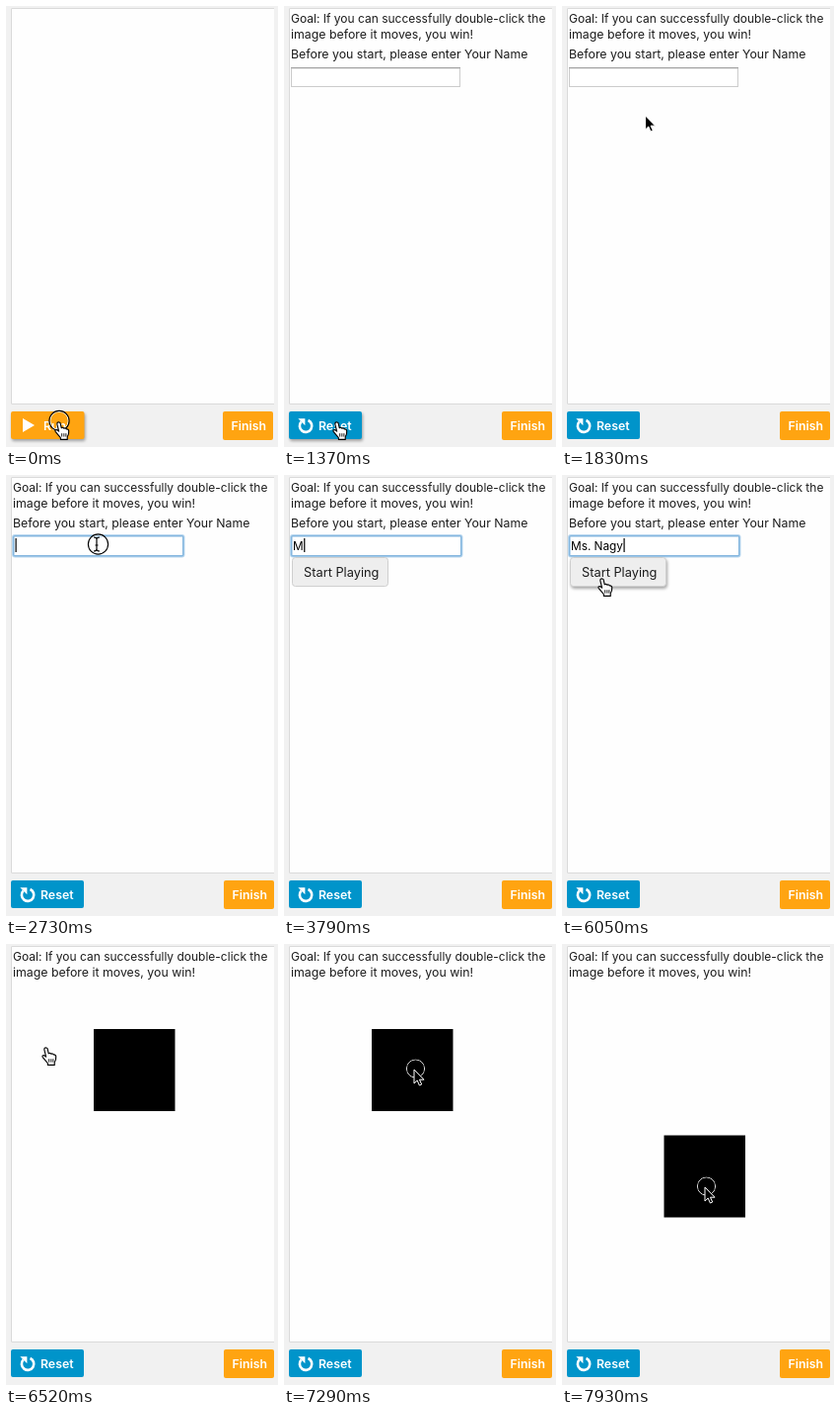
An HTML page that plays this animation: 276x446 px, repeating every 8000 ms.

```html
<!DOCTYPE html>
<html lang="en">
<head>
<meta charset="utf-8">
<title>Double-click game</title>
<style>
html, body { margin: 0; width: 100%; height: 100%; overflow: hidden; background: #f1f1f1; }
svg { display: block; width: 276px; height: 446px; }
text { font: 12px Inter, "Open Sans", sans-serif; fill: #1c1c1c; white-space: pre; }
.wide { font-size: 12.35px; }
.label { font-size: 12.3px; font-weight: 600; fill: #fff; }
.hover { filter: drop-shadow(1.5px 2px 1.5px rgba(0, 0, 0, .34)); }
</style>
</head>
<body>
<svg viewBox="0 0 276 446">
  <rect width="276" height="446" fill="#f1f1f1"/>
  <rect x="5" y="2" width="267" height="401" fill="#fefefe"/>
  <path d="M272 2.5H5.5V402.5H272" fill="none" stroke="#dadada"/>

  <g id="goal">
    <text x="7" y="17">Goal: If you can successfully double-click the</text>
    <text class="wide" x="7" y="33">image before it moves, you win!</text>
  </g>
  <text id="ask" class="wide" x="7" y="53">Before you start, please enter Your Name</text>
  <g id="field">
    <rect x="7.5" y="62.5" width="171" height="19" fill="#fff" stroke="#ccc"/>
    <path d="M7 62.5H179" stroke="#a2a2a2"/>
    <path d="M8 63.5H178" stroke="#e6e6e6"/>
    <g id="focus">
      <rect x="6" y="60" width="175.5" height="23.5" rx="3" fill="#b9d7ef"/>
      <rect x="7" y="61" width="173.5" height="21.5" rx="2" fill="#85b7df"/>
      <rect x="8.5" y="62.5" width="170.5" height="18.5" fill="#fff"/>
    </g>
    <text id="name" x="9" y="76" style="font-size:11.8px;fill:#000"></text>
    <rect id="caret" y="64" width="1.2" height="14"/>
  </g>
  <g id="start">
    <rect x="8.5" y="83.5" width="97" height="29" rx="3" fill="#eee" stroke="#cfcfcf"/>
    <text x="20" y="103" style="font-size:12.8px">Start Playing</text>
  </g>
  <rect id="target" width="82.5" height="83"/>

  <g id="run">
    <rect x="5" y="410" width="74.5" height="28" rx="2" fill="#ffa411"/>
    <path d="M17 417V431L29 424Z" fill="#fff"/>
    <text class="label" x="38" y="429">Run</text>
  </g>
  <g id="reset">
    <rect x="5" y="410" width="74" height="28" rx="2" fill="#0094ca"/>
    <path d="M24.5 419A6.2 6.2 0 1 1 17.6 420.4" fill="none" stroke="#fff" stroke-width="2.6"/>
    <path d="M14.3 417.3H21.4V424.2Z" fill="#fff"/>
    <text class="label" x="35" y="429">Reset</text>
  </g>
  <g id="finish">
    <rect x="220" y="410" width="51" height="29" rx="2" fill="#ffa411"/>
    <text class="label" x="228.5" y="429">Finish</text>
  </g>

  <g id="ring" fill="none">
    <circle r="9.2" stroke="#fff"/>
    <circle r="10.1" stroke="#000" stroke-width="1.1"/>
  </g>
  <g id="cursor">
    <path id="arrow" d="M0 0V14L3.2 11L5.4 16L7.7 15L5.5 10.2H10Z" stroke="#fff"/>
    <path id="beam" d="M-3 -7Q0 -7 0 -5V5Q0 7 -3 7M3 -7Q0 -7 0 -5M3 7Q0 7 0 5M-1.5 1H1.5" fill="none" stroke="#000" stroke-width="1.2"/>
    <g id="hand" transform="translate(-6 -2) scale(1.13)" stroke="#000" stroke-linejoin="round">
      <path fill="#fff" d="M3.6 1.3C4.5 .3 6.1 .8 6.4 2L7.3 6C8 5.2 9.2 5.6 9.6 6.4C10.4 5.8 11.5 6.2 11.8 7.1C12.8 6.7 13.8 7.4 13.9 8.6C14.1 11 13.2 13 12.6 14V16.3H6.6L6.4 14.5C5 13.2 3.4 11 2 9.4C1.2 8.3 2.2 7.2 3.4 7.8L5 9L3.4 2.6Z"/>
      <path d="M7.7 10.8V13.8M9.6 10.8V13.8M11.4 10.8V13.8" stroke-width=".8"/>
    </g>
  </g>
</svg>
<script>
const LOOP = 8000;
const NAME = "Ms. Nagy";
const KEYS = [3790, 3970, 4210, 4320, 4560, 4740, 4920, 5040];

const el = {};
document.querySelectorAll("[id]").forEach(e => el[e.id] = e);

const within = (t, a, b) => t >= a && t < b;
const show = (e, on) => e.setAttribute("display", on ? "inline" : "none");
const place = (e, x, y) => e.setAttribute("transform", `translate(${x} ${y})`);

// begin, end, steps, x, y: each leg starts where the previous one stopped
const LEGS = [
  [1430, 1890, 9, 89, 66],
  [2310, 2310, 1, 92, 70],
  [2850, 2970, 3, 120, 92],
  [3020, 3020, 1, 262, 135],
  [5700, 6050, 7, 41, 106],
  [6940, 7110, 4, 132, 127],
  [7590, 7870, 5, 145, 246]
];

function pointer(t) {
  let x = 54, y = 422;
  for (const [a, b, n, tx, ty] of LEGS) {
    if (t < a) break;
    const p = t >= b ? 1 : (Math.floor((t - a) / (b - a) * (n - 1)) + 1) / n;
    const e = p * p * (3 - 2 * p);
    x += (tx - x) * e;
    y += (ty - y) * e;
  }
  return [x, y];
}

function draw(t) {
  const [x, y] = pointer(t);
  const form = t < 6430;
  const started = t >= 830;
  const startUp = within(t, 3790, 6430);

  show(el.run, !started);
  show(el.reset, started);
  place(el.finish, started ? 1 : 0, 0);
  show(el.goal, t >= 890);
  show(el.ask, form && t >= 950);
  show(el.field, form && t >= 1070);
  show(el.focus, t >= 2730);
  show(el.start, startUp);

  el.name.textContent = NAME.slice(0, KEYS.filter(k => t >= k).length);
  if (form && t >= 2730) {
    const w = el.name.textContent ? el.name.getComputedTextLength() : 0;
    el.caret.setAttribute("x", 9.5 + w);
  }
  show(el.caret, t >= 2730 && !within(t, 3250, 3430) && !within(t, 5520, 5700));

  show(el.target, t >= 6520);
  if (t < 7530) place(el.target, 89, 86);
  else place(el.target, 103.5, 193.5);

  const onBar = y > 409;
  const onField = form && x < 180 && within(y, 61, 83);
  const onStart = startUp && within(x, 8, 106) && within(y, 83, 113);
  const hand = onBar || onStart || within(t, 6430, 6940);
  show(el.hand, hand);
  show(el.beam, onField);
  show(el.arrow, !hand && !onField);
  show(el.cursor, !within(t, 3020, 5700));
  place(el.cursor, x, y);
  el.run.classList.toggle("hover", onBar);
  el.reset.classList.toggle("hover", onBar);
  el.start.classList.toggle("hover", onStart);

  const click = t < 60 || within(t, 2730, 2790) || within(t, 6340, 6430) ||
    within(t, 7290, 7470) || t >= 7930;
  show(el.ring, click);
  place(el.ring, x + (hand ? 0 : 1.5), y - (hand ? 2.5 : onField ? 0 : 1));
}

const begin = performance.now();
function tick() {
  draw((performance.now() - begin) % LOOP);
  requestAnimationFrame(tick);
}
tick();
</script>
</body>
</html>
```
